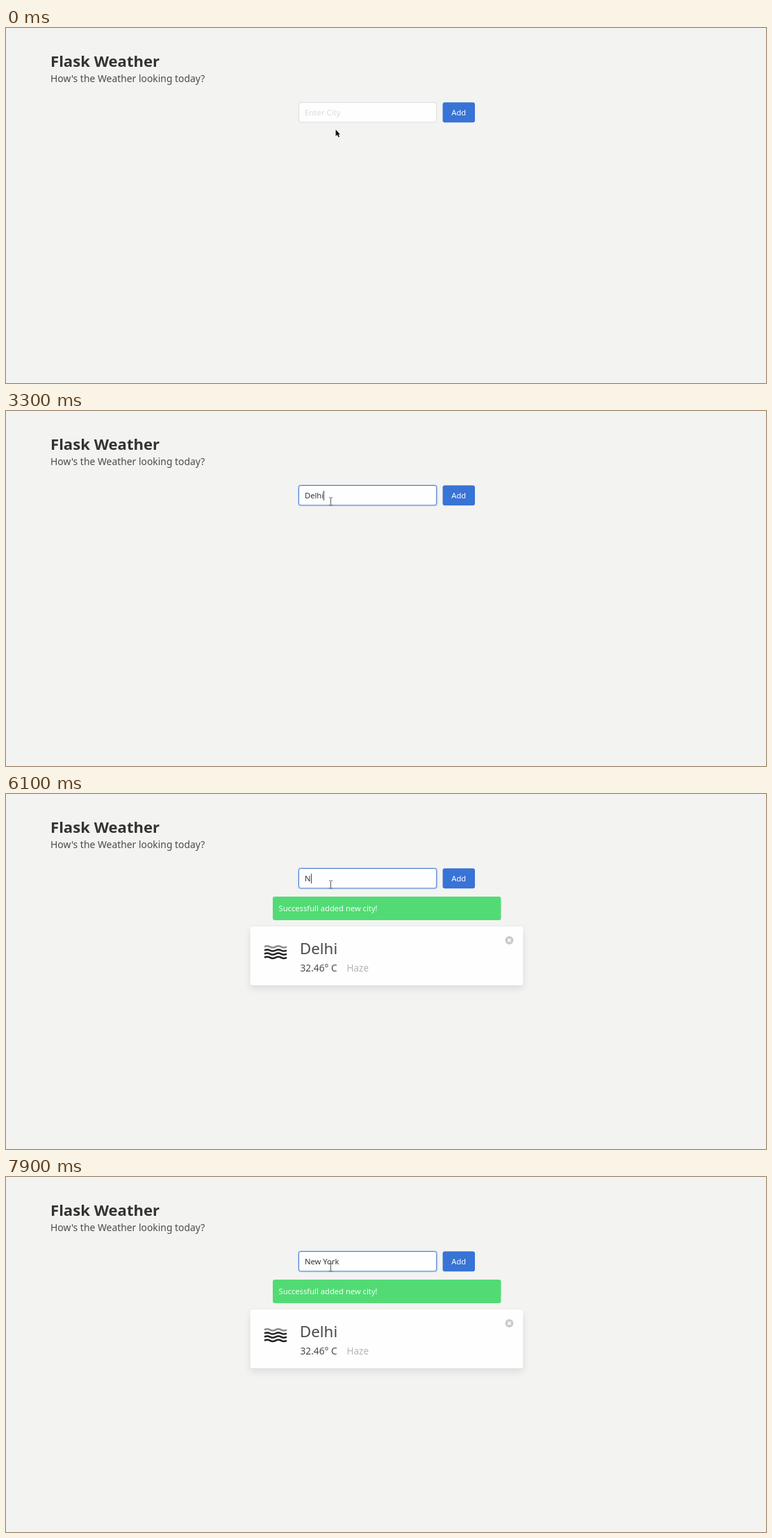
Write an HTML page that moves like this. It is 1094x512 px and loops after 8000 ms.

```html
<!DOCTYPE html>
<html lang="en">
<head>
<meta charset="utf-8">
<title>Flask Weather</title>
<style>
  html, body { margin: 0; width: 100%; height: 100%; overflow: hidden; background: #f3f3f1; }
  svg { display: block; width: 1094px; height: 512px; }
  text { font-family: "Noto Sans", "Open Sans", sans-serif; font-size: 11.2px; fill: #363636; white-space: pre; }
  #title { font-size: 22.1px; font-weight: 700; fill: #333331; }
  #subtitle { font-size: 13.9px; fill: #4a4a4a; }
  #placeholder { font-size: 11.4px; fill: #dbdbda; }
  #menu { filter: drop-shadow(0 1px 2px rgba(0, 0, 0, .35)); }
  #menu text { font-size: 10.3px; fill: #b9bbc1; }
  #card { filter: drop-shadow(0 5px 5px rgba(10, 10, 10, .09)) drop-shadow(0 0 1px rgba(10, 10, 10, .06)); }
  .light { fill: #fff; }
  .notice { fill: #f4fff6; }
  .city { font-size: 22.3px; fill: #4a4a4a; }
  .temp { font-size: 13.7px; fill: #4a4a4a; }
  .sky { font-size: 13.5px; fill: #b5b5b5; }
</style>
</head>
<body>
<svg viewBox="0 0 1094 512">
  <text id="title" x="64" y="56">Flask Weather</text>
  <text id="subtitle" x="64" y="77.5">How's the Weather looking today?</text>

  <rect id="glow" x="420" y="106" width="201.4" height="31.2" rx="4" fill="#c3d2ec"/>
  <rect id="field" x="421.5" y="107.5" width="198.2" height="28.4" rx="3" fill="#fefefe"/>
  <text id="placeholder" x="430" y="126">Enter City</text>
  <text id="typed" x="430" y="126"></text>
  <rect id="caret" y="115" width="1" height="14" fill="#444"/>

  <rect x="628.6" y="107.2" width="46.4" height="29" rx="3" fill="#3873d6"/>
  <text class="light" x="641.3" y="126">Add</text>

  <g id="result">
    <rect x="384" y="148" width="328.5" height="34" rx="3" fill="#52db74"/>
    <text class="notice" x="392.5" y="169">Successfull added new city!</text>
    <g id="card"><rect x="351.5" y="191" width="393" height="85" rx="4" fill="#fefefe"/></g>
    <g id="haze" fill="none" stroke-width="2.5"></g>
    <text class="city" x="423" y="231">Delhi</text>
    <text class="temp" x="423.5" y="256">32.46° C</text>
    <text class="sky" x="490.5" y="256">Haze</text>
    <circle cx="724.5" cy="211" r="5.9" fill="#cacac9"/>
    <path d="M722.4 208.9l4.2 4.2m0-4.2l-4.2 4.2" stroke="#fefefe" stroke-width="1.6"/>
  </g>

  <g id="menu"></g>
  <path id="arrow" d="M0 0V9.6L2.2 7.7L4 11.2L5.6 10.4L3.9 7.1H6.4Z" fill="#111"
        stroke="#fff" stroke-width=".9" paint-order="stroke"/>
  <path id="beam" d="M-2.5-5.5h2m1 0h2M0-5V5M-2.5 5.5h2m1 0h2" fill="none" stroke="#5b5b5b"/>
</svg>
<script>
const $ = id => document.getElementById(id);
const LOOP = 8000;
const FOCUS = "#4f82d5", HOVER = "#b5b5b5", IDLE = "#dbdbdb";
const delhi = ["Delhi", "delhi", "dELhi"];
const york = ["New York", "New Bork", "new york"];
const yorkOnly = ["New York", "new york"];

// Each step changes only the listed parts of the state.
const steps = [
  [0, { text: "", caret: false, border: IDLE, menu: [], result: false, haze: false,
        pointer: "arrow", x: 474.6, y: 146.4 }],
  [500, { x: 469, y: 139 }],
  [600, { x: 467, y: 130, pointer: "beam", border: HOVER }],
  [800, { border: FOCUS, caret: true }],
  [1100, { text: "D", menu: [...delhi, "Dubai"], pointer: "arrow" }],
  [1200, { text: "De", menu: delhi }],
  [1300, { text: "Del" }],
  [1500, { text: "Delh" }],
  [1600, { text: "Delhi" }],
  [1800, { menu: [], pointer: "beam" }],
  [2000, { caret: false }],
  [3300, { caret: true }],
  [4400, { caret: false }],
  [4900, { pointer: "arrow" }],
  [5000, { text: "", border: HOVER, result: true, pointer: "beam" }],
  [5600, { border: FOCUS, caret: true, haze: true }],
  [6100, { text: "N" }],
  [6200, { text: "Ne", menu: york, pointer: "arrow" }],
  [6300, { text: "New" }],
  [6400, { text: "New " }],
  [6600, { text: "New Y" }],
  [6700, { text: "New Yo", menu: yorkOnly }],
  [6900, { text: "New Yor" }],
  [7100, { text: "New York" }],
  [7200, { menu: [], pointer: "beam" }],
  [7900, { caret: false }],
];

$("haze").innerHTML = [0, 1, 2, 3].map(i =>
  `<path d="M372 ${220.3 + i * 5.2}q4-2.2 8 0t8 0t8 0t8 0" stroke="${i ? "#222" : "#8c8c8c"}"/>`).join("");

const show = (id, visible) => $(id).style.display = visible ? "" : "none";

function drawMenu(items) {
  const rows = items.map((item, i) => `<text x="426.3" y="${149 + i * 14.4}">${item}</text>`);
  $("menu").innerHTML =
    `<rect x="421" y="136" width="199" height="${3 + items.length * 14.4}" fill="#181a25"/>` + rows.join("");
}

function draw(state) {
  show("glow", state.border === FOCUS);
  $("field").setAttribute("stroke", state.border);
  $("typed").textContent = state.text;
  show("placeholder", !state.text);
  show("caret", state.caret);
  $("caret").setAttribute("x", Math.round(430 + (state.text ? $("typed").getComputedTextLength() : 0)));
  show("result", state.result);
  show("haze", state.haze);
  show("menu", state.menu.length);
  drawMenu(state.menu);
  for (const id of ["arrow", "beam"]) {
    show(id, state.pointer === id);
    const nudge = id === "beam" ? .5 : 0;
    $(id).setAttribute("transform", `translate(${state.x + nudge} ${state.y + nudge})`);
  }
}

let drawn = -1;
function tick() {
  const time = performance.now() % LOOP;
  const past = steps.filter(([start]) => start <= time);
  if (past.length !== drawn) {
    drawn = past.length;
    draw(Object.assign({}, ...past.map(([, change]) => change)));
  }
  requestAnimationFrame(tick);
}
tick();
</script>
</body>
</html>
```
